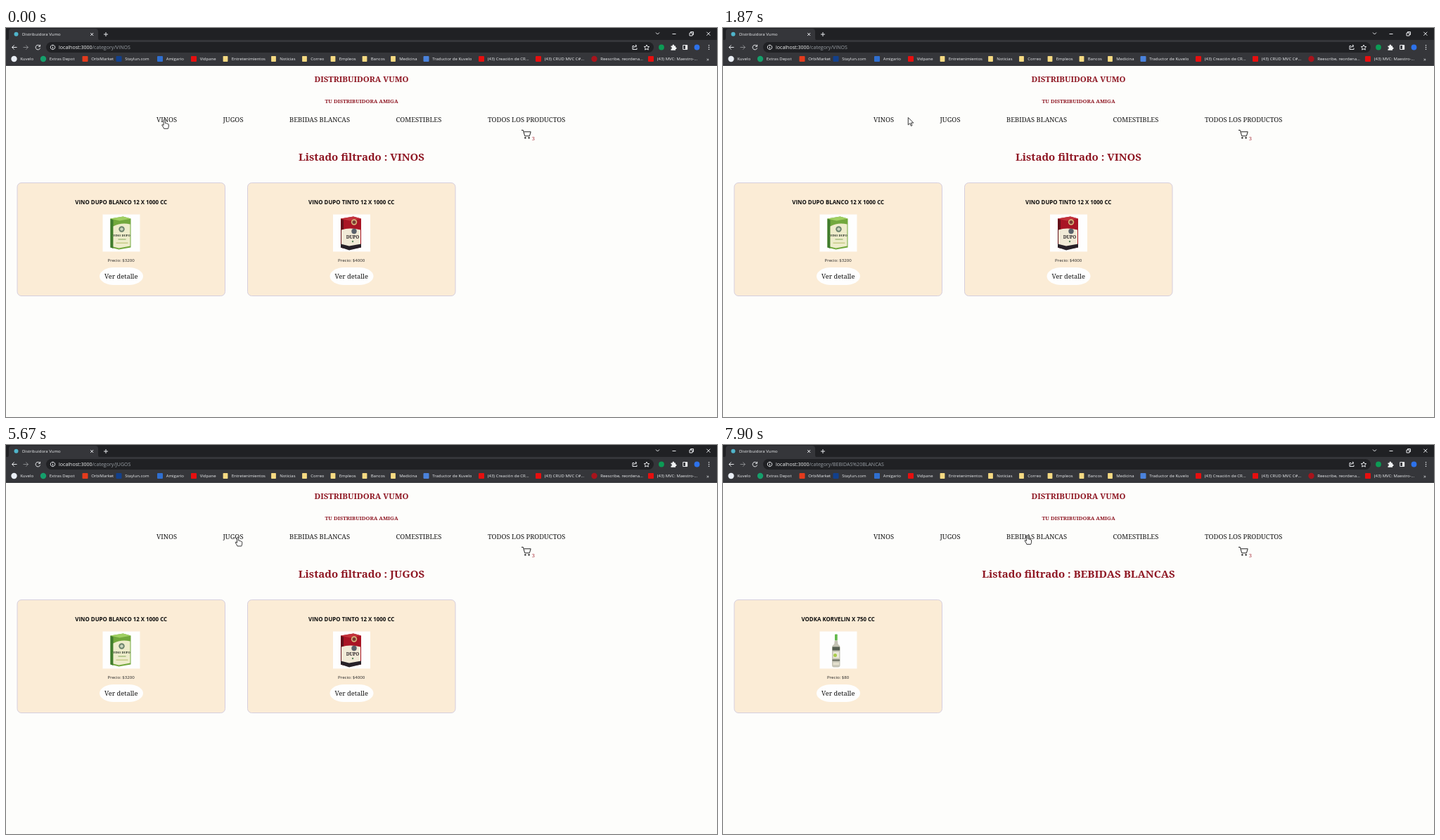
Animation, 1011 px wide and 554 px high, one loop 8 s. Source, as an HTML page:

```html
<!DOCTYPE html>
<html lang="es">
<head>
<meta charset="utf-8">
<title>Distribuidora Vumo</title>
<style>
html, body { margin: 0; width: 100%; height: 100%; overflow: hidden; background: #fdfdfb; }
svg { display: block; width: 100vw; height: 100vh; }
.ui { font-family: "Open Sans", "Noto Sans", sans-serif; }
.serif { font-family: "Noto Serif", "Liberation Serif", serif; }
.line { fill: none; stroke: #e8eaed; stroke-width: 1; }
.bold { font-weight: 700; }
.mid { text-anchor: middle; }
</style>
</head>
<body>
<svg id="stage" viewBox="0 0 1011 554" preserveAspectRatio="none"></svg>
<script>
const LOOP = 8000;
const RED = '#8f1824';
const stage = document.getElementById('stage');

const rect = (x, y, w, h, fill, more = '') =>
  `<rect x="${x}" y="${y}" width="${w}" height="${h}" fill="${fill}" ${more}/>`;
const disc = (x, y, r, fill) => `<circle cx="${x}" cy="${y}" r="${r}" fill="${fill}"/>`;
const shape = (d, fill) => `<path d="${d}" fill="${fill}"/>`;
const line = (d, more = '') => `<path class="line" d="${d}" ${more}/>`;
const text = (x, y, size, value, cls, fill, more = '') =>
  `<text x="${x}" y="${y}" font-size="${size}" class="${cls}" fill="${fill}" ${more}>${value}</text>`;

function bookmarks() {
  const dot = (x, c) => disc(x, 44, 4.2, c);
  const box = (x, c) => rect(x - 4, 40, 8, 8, c, 'rx="1"');
  const folder = x => rect(x - 3.4, 40, 6.8, 8, '#f6da82', 'rx=".7"');
  const video = x => box(x, '#e60f0f');
  const items = [
    [dot, 11.5, 'Kuvelo', '#e9eef5'], [dot, 53, 'Extras Depot', '#159f6b'],
    [box, 112.5, 'OrbiMarket', '#e43b1d'], [box, 160.5, 'Staylun.com', '#12408c'],
    [box, 219, 'Amigario', '#2f6fd0'], [video, 267, 'Vidpane'],
    [folder, 312, 'Entretenimientos'], [folder, 380.5, 'Noticias'],
    [folder, 424.5, 'Correo'], [folder, 465, 'Empleos'],
    [folder, 510, 'Bancos'], [folder, 550.5, 'Medicina'],
    [box, 597.5, 'Traductor de Kuvelo', '#4a83dd'],
    [video, 676, '(43) Creación de CR...'], [video, 757, '(43) CRUD MVC C#...'],
    [dot, 836.5, 'Reescribe, reordena...', '#a8141c'], [video, 917, '(43) MVC: Maestro-...']
  ];
  return items.map(([icon, x, label, color]) =>
    icon(x, color) + text(x + 8.7, 46.3, 6, label, 'ui', '#eceef0')).join('');
}

function browser() {
  return rect(0, 0, 1011, 18, '#202124') +
    rect(0, 17, 1011, 37, '#35363a') +
    shape('M1 18Q4 17 4 14V5Q4 1 8 1H127Q131 1 131 5V14Q131 17 134 18Z', '#35363a') +
    disc(14.5, 8.8, 3, '#4fb4ca') +
    text(23, 11, 6, 'Distribuidora Vumo', 'ui', '#eceef0') +
    line('M120.2 7l4 4m0-4l-4 4M139 9h6m-3-3v6') +
    line('M924 6.5l2.5 2.5 2.5-2.5M947.5 8.5h5M972 7h4v4h-4zM973.5 7V5.5h4v4H976M996.3 5.7l5 5m0-5l-5 5') +
    line('M15.5 27.5H8.7m3-3.1l-3.1 3.1 3.1 3.1') +
    line('M24.5 27.5h6.8m-3-3.1l3.1 3.1-3.1 3.1', 'opacity=".45"') +
    line('M48 25.5A3.3 3.3 0 1 0 48.6 28.5M48.6 23.8v2.5h-2.7') +
    rect(57, 20, 864, 15, '#202124', 'rx="7.5"') +
    line('M66.5 24.2a3.2 3.2 0 1 0 .01 0M66.5 27v2.3M66.5 25.3v.9', 'stroke-width=".8"') +
    `<text x="75" y="30" font-size="7.05" class="ui" fill="#f1f3f4">localhost:3000<tspan id="path" fill="#9aa0a6"></tspan></text>` +
    line('M893 25.5h-2v5h6v-2M892.5 28.5q.5-3 4-3m-1.5-1.7l2 1.7-2 1.7', 'stroke-width=".8"') +
    line('M911 24l1.1 2.4 2.6.3-1.9 1.8.5 2.6-2.3-1.3-2.3 1.3.5-2.6-1.9-1.8 2.6-.3z', 'stroke-width=".8"') +
    disc(932, 27.5, 3.9, '#0c9b55') +
    shape('M945.5 25.5h2q0-2 1.4-2t1.4 2h1.7v2q1.6 0 1.6 1.3T952 30.200v1.500h-6.500v-2q1.500 0 1.500-1.200t-1.500-1.200z', '#f1f3f4') +
    line('M962.700 24.500h6v6h-6z') + rect(966, 24.500, 3, 6, '#f1f3f4') +
    disc(982.5, 27.5, 3.900, '#2d72ea') +
    [24.700, 27.500, 30.300].map(y => disc(999.5, y, .8, '#e8eaed')).join('') +
    bookmarks() + text(996, 46.5, 7.5, '»', 'ui', '#eceef0');
}

function header() {
  const nav = [[214, 'VINOS'], [308.5, 'JUGOS'], [403, 'BEBIDAS BLANCAS'],
    [554.5, 'COMESTIBLES'], [685, 'TODOS LOS PRODUCTOS']];
  return text(505.5, 77, 11.4, 'DISTRIBUIDORA VUMO', 'serif bold mid', RED) +
    text(505.5, 106.7, 7.5, 'TU DISTRIBUIDORA AMIGA', 'serif bold mid', RED) +
    nav.map(([x, label]) => text(x, 133.5, 9.45, label, 'serif', '#151515')).join('') +
    '<path d="M733 145.500h2.300l2.400 8.300h6.700l1.800-6h-9.800" fill="none" stroke="#222" stroke-linejoin="round"/>' +
    disc(738.400, 156.400, 1.2, '#222') + disc(743.600, 156.400, 1.2, '#222') +
    text(747.700, 160, 7.5, '3', 'serif', '#a8303a') +
    text(505.5, 188.700, 15, '<tspan id="category"></tspan>', 'serif bold mid', RED);
}

// Product pictures, each on a 53 by 53 tile.
const carton = (main, dark, top) =>
  shape('M11 6L29 3 40 6V47L23 50 11 47Z', main) +
  shape('M11 6L29 3 40 6 24 9Z', top) +
  shape('M11 6L15 8V48.500L11 47Z', dark);

const whiteWine = () => carton('#72a83d', '#3f7b2d', '#a0cf62') +
  shape('M15 17Q26 11 39 14V45L23 48 15 46Z', '#eeeccb') +
  disc(27, 21, 4.2, '#69806a') + disc(27, 21, 2.3, '#c9d3bb') +
  text(27, 31, 4.2, 'VINO DUPO', 'serif bold mid', '#263126') +
  rect(22, 35, 11, 1, '#81a95a') + rect(19, 40, 17, 1.400, '#c5ca83');

const redWine = () => carton('#a91525', '#65101a', '#c3323b') +
  shape('M12 22Q24 18 39 22V46L23 50 12 47Z', '#f1ead7') +
  shape('M11 42L23 45 40 42V47L23 51 11 47Z', '#272128') +
  disc(30, 11, 4.2, '#d5b47a') + disc(30, 11, 2.500, '#793b34') +
  disc(30, 24, 3.700, '#5a626b') +
  text(28, 34, 6.3, 'DUPO', 'serif bold mid', '#241d21') +
  disc(28, 38.500, 1.2, '#57855a');

const juice = () => rect(23, 2, 6, 4, '#34c74f', 'rx="1"') +
  shape('M18 7L32 5 36 8V48L20 51 17 48Z', '#35b936') +
  shape('M18 7L32 5 36 8 34 14 19 14Z', '#55dc5a') +
  rect(20, 9, 13, 3, '#d83a3d') +
  shape('M17 28Q25 21 36 25V48L20 51 17 48Z', '#f0ca4a') +
  shape('M19 21Q26 13 34 16 32 23 21 25Z', '#168c35') +
  disc(22, 34, 5, '#da3838') + disc(31, 34, 4.800, '#ee892e') +
  rect(19, 41, 15, 5, '#f6ead0') + shape('M17 46H36V48L20 51 17 48Z', '#ed902b');

const vodka = () => rect(21.500, 4, 3.700, 9, '#63b84a', 'rx=".8"') +
  shape('M21.300 13H25.400L26 18Q29 20 29 23V48Q29 51 26 51H20Q17.500 51 17.500 48V23Q17.500 20 20.700 18Z', '#c4c3b5') +
  rect(18, 22, 10.600, 5, '#555f52') + rect(19, 29, 8.600, 9, '#ebe9da') +
  disc(22, 34, 2.5, '#a8cc4b') + rect(18, 40, 10.600, 2, '#676b5e') +
  rect(19, 44, 8.600, 4, '#e4e0ce');

function card(x, name, price, picture) {
  return `<g transform="translate(${x} 220)">` +
    rect(0, .5, 295.5, 161, '#fbecd6', 'rx="6" stroke="#d5cede" stroke-width="1"') +
    text(147.700, 31, 7.900, name, 'ui bold mid', '#0c0c0c') +
    `<g transform="translate(121.500 45.500)">${rect(0, 0, 53, 53, '#fefefe')}${picture()}</g>` +
    text(147.700, 113, 6.100, price, 'ui mid', '#222') +
    rect(117, 121, 62, 25, '#fefefe', 'rx="20" ry="12.5"') +
    text(147.700, 137.300, 9.300, 'Ver detalle', 'serif mid', '#151515') + '</g>';
}

const HAND = 'M-1.100 8V1.100Q-1.100 0 0 0T1.100 1.100V5Q3 4.600 3 5.600 4.600 5.200 4.700 6.200 6.100 6 6.100 7.200V9.500Q6 11 5.200 12.800H-.6Q-1.200 11-3.600 7.600-3.400 6-1.100 8Z';
const ARROW = 'M0 0V10.500L2.500 8.200 4.100 12 5.700 11.300 4.100 7.600H7.500Z';

stage.innerHTML = rect(0, 0, 1011, 554, '#fdfdfb') + browser() + header() +
  `<g class="list">${card(16, 'VINO DUPO BLANCO 12 X 1000 CC', 'Precio: $3200', whiteWine)}` +
  `${card(343.500, 'VINO DUPO TINTO 12 X 1000 CC', 'Precio: $4000', redWine)}</g>` +
  `<g class="list">${card(16, 'JUGO TIVELO 8 X 1000 CC DURAZNO', 'Precio: $400', juice)}</g>` +
  `<g class="list">${card(16, 'VODKA KORVELIN X 750 CC', 'Precio: $80', vodka)}</g>` +
  '<path id="cursor" fill="#fff" stroke="#222" stroke-width=".9" stroke-linejoin="round"/>';

const pathLabel = document.getElementById('path');
const heading = document.getElementById('category');
const cursor = document.getElementById('cursor');
const lists = stage.querySelectorAll('.list');

const CATEGORIES = ['VINOS', 'JUGOS', 'BEBIDAS BLANCAS'];
const CLICKS = [5200, 7200];
const FETCH_DELAY = 500;
const LINKS = [[213, 245], [307, 339], [401, 491]];

// Cursor tip: time, x, y
const MOVES = [
  [0, 225.200, 130.500], [380, 225.200, 130.500], [830, 313, 127.500],
  [1580, 313, 127.500], [2100, 228.600, 127.500], [4200, 228.600, 127.500],
  [4800, 329.600, 131.200], [6110, 329.600, 131.200], [6170, 324.500, 131],
  [6200, 327.700, 131.200], [6580, 327.700, 131.200], [6800, 411, 136],
  [7000, 432.500, 128.600], [LOOP, 432.500, 128.600]
];

function tipAt(t) {
  const i = MOVES.findIndex(move => move[0] > t);
  const [t0, x0, y0] = MOVES[i - 1];
  const [t1, x1, y1] = MOVES[i];
  const u = (t - t0) / (t1 - t0);
  const k = u * u * (3 - 2 * u);
  return [x0 + (x1 - x0) * k, y0 + (y1 - y0) * k];
}

function draw(t) {
  const chosen = CLICKS.filter(at => t >= at).length;
  const loaded = CLICKS.filter(at => t >= at + FETCH_DELAY).length;
  pathLabel.textContent = '/category/' + CATEGORIES[chosen].replace(' ', '%20');
  heading.textContent = 'Listado filtrado : ' + CATEGORIES[chosen];
  lists.forEach((list, i) => { list.style.display = i === loaded ? '' : 'none'; });

  const [x, y] = tipAt(t);
  const overLink = LINKS.some(([left, right]) => x >= left && x <= right);
  cursor.setAttribute('d', overLink ? HAND : ARROW);
  cursor.setAttribute('transform', `translate(${x} ${y})`);
}

const start = performance.now();
function tick() {
  draw((performance.now() - start) % LOOP);
  requestAnimationFrame(tick);
}
tick();
</script>
</body>
</html>
```
